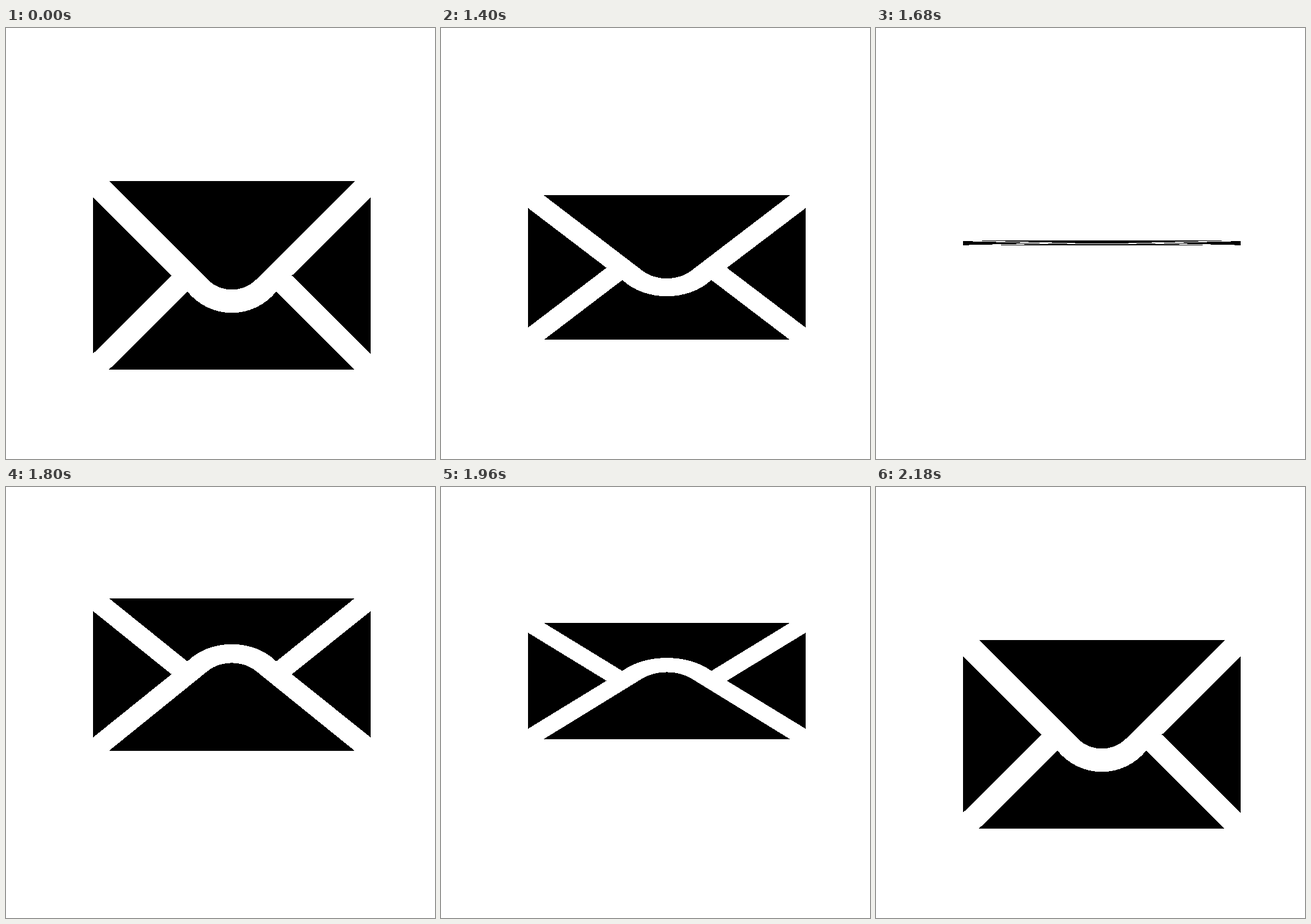
An HTML page for the animation above (2.98 s loop, 700 px wide and 704 px high).

```html
<!DOCTYPE html>
<html lang="en">
<head>
<meta charset="utf-8">
<title>Envelope flip</title>
<style>
  html, body { margin: 0; width: 100%; height: 100%; overflow: hidden; background: #fff; }
  svg { display: block; width: 100vw; height: 100vh; }
</style>
</head>
<body>
<svg viewBox="0 0 700 704" shape-rendering="crispEdges">
  <g id="envelope">
    <path d="M168 250H569L408 411A56 56 0 0 1 329 411Z"/>
    <path d="M168 558L296 430.5A93 93 0 0 0 441 430.5L569 558Z"/>
    <path d="M142 277L270 404.5L142 532Z"/>
    <path d="M595 277L466.5 404.5L595 532Z"/>
  </g>
</svg>
<script>
  const LOOP = 2980;
  const STEP = 20;
  const AXIS_Y = 350;
  const envelope = document.getElementById('envelope');

  // Rotation about the horizontal axis: [time in ms, degrees]
  const turn = [[1180, 0], [1520, 61.9], [1680, 88.5], [1900, 190.3], [2040, 287.7], [2180, 360]];

  function angleAt(time) {
    if (time <= turn[0][0]) return 0;
    const next = turn.findIndex(([at]) => at >= time);
    if (next < 0) return 360;
    const [t0, a0] = turn[next - 1];
    const [t1, a1] = turn[next];
    return a0 + (a1 - a0) * (time - t0) / (t1 - t0);
  }

  function render(time) {
    const stepped = Math.floor(time / STEP) * STEP;
    const scale = Math.cos(angleAt(stepped) * Math.PI / 180);
    envelope.setAttribute('transform', `matrix(1 0 0 ${scale.toFixed(5)} 0 ${(AXIS_Y * (1 - scale)).toFixed(3)})`);
  }

  const start = performance.now();
  function tick() {
    render((performance.now() - start) % LOOP);
    requestAnimationFrame(tick);
  }
  render(0);
  requestAnimationFrame(tick);
</script>
</body>
</html>
```
